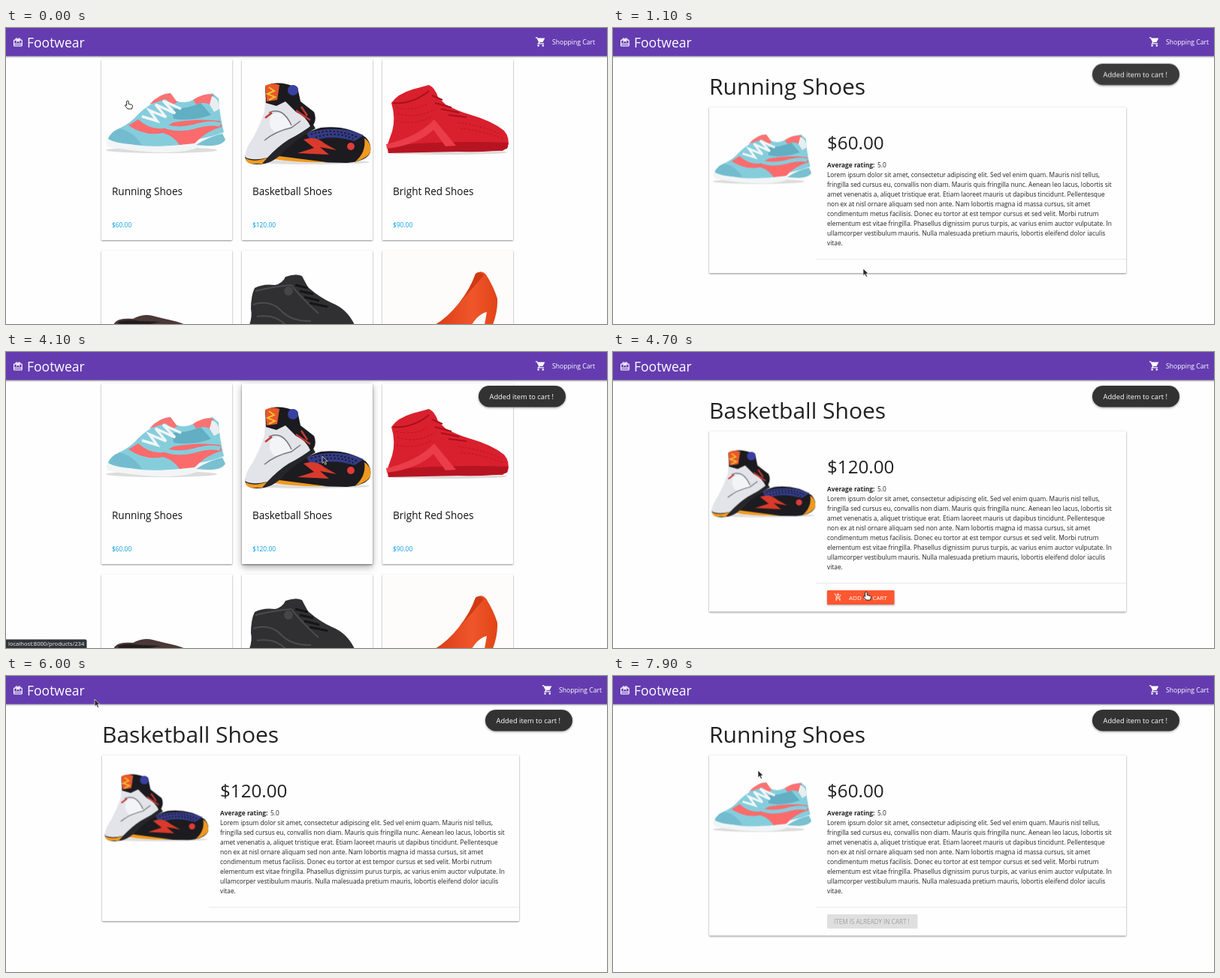
These frames come from a looping animation (800 by 395 pixels, 8000 ms). An HTML page:

```html
<!DOCTYPE html>
<html lang="en">
<head>
<meta charset="utf-8">
<title>Footwear</title>
<style>
html, body { margin: 0; width: 100%; height: 100%; overflow: hidden; background: #fefefe; }
svg { display: block; width: 100%; height: 100%; font-family: "Open Sans", "Noto Sans", sans-serif; }
text { white-space: pre; }
.card { fill: #fefefe; filter: drop-shadow(0 1px 1.1px rgba(0,0,0,.45)); }
.lift { fill: #fefefe; filter: drop-shadow(0 4px 5px rgba(0,0,0,.32)); }
.pill { fill: #323232; filter: drop-shadow(0 1px 1.5px rgba(0,0,0,.4)); }
.bar { fill: #643cb0; filter: drop-shadow(0 1px 1px rgba(0,0,0,.4)); }
.line { fill: none; stroke: #fff; stroke-width: 2; }
</style>
</head>
<body>
<svg id="stage" viewBox="0 0 800 395" preserveAspectRatio="none">
  <defs>
    <linearGradient id="orange">
      <stop offset="0" stop-color="#d93c16"/><stop offset=".6" stop-color="#f0562b"/><stop offset="1" stop-color="#e04416"/>
    </linearGradient>
    <g id="runner">
      <ellipse cx="80" cy="121" rx="74" ry="4" fill="#dcdcdc"/>
      <path fill="#f2f5f6" d="M8 106Q4 115 12 117Q70 127 105 123Q120 121 130 117Q160 116 165 107L160 94Z"/>
      <path fill="#79c0d0" d="M126 114Q145 102 161 99L165 107Q160 116 140 115Z"/>
      <path fill="#86cddc" d="M9 106Q12 97 24 92Q40 84 48 74Q58 64 72 56Q80 44 92 45L99 55Q112 60 122 54Q137 47 148 45L156 52Q157 72 163 97Q148 103 130 106L105 114Q60 118 40 113Q18 112 9 106Z"/>
      <path fill="#73bccf" d="M9 106Q12 97 24 92Q42 96 54 114Q25 113 9 106Z"/>
      <path fill="#62aec3" d="M94 66Q118 65 132 58L146 74Q120 83 96 79Z"/>
      <path fill="#fb6b6c" d="M36 88L49 80Q64 94 82 92L96 84Q130 78 158 82L160 90Q140 95 124 112L104 114Q96 102 82 98Q58 103 36 88Z"/>
      <path fill="none" stroke="#86cddc" stroke-width="6" d="M78 86Q96 96 122 90Q145 83 158 87"/>
      <path fill="#fb7273" d="M64 60Q76 46 92 45L101 57L94 61L86 53ZM122 54Q137 44 149 47L147 62Q138 55 126 60Z"/>
      <path fill="#e9eef0" d="M147 49Q157 52 157 66L150 70L144 60Z"/>
      <path fill="none" stroke="#f1f6f7" stroke-width="3.5" d="M54 76L74 82L64 68L86 77L72 60L98 72L82 55L106 66"/>
    </g>
    <g id="hoops">
      <ellipse cx="90" cy="137" rx="80" ry="3" fill="#dedede"/>
      <path fill="#1c1b20" d="M48 130Q75 99 105 91Q140 87 165 104Q173 112 171 124Q166 136 140 138Q90 138 48 130Z"/>
      <path fill="#343b86" d="M86 98Q130 86 162 101L150 109Q116 99 92 110Z"/>
      <path fill="#d93a2b" d="M82 107Q98 101 110 112L126 121L104 117L116 127L74 125L96 118Z"/>
      <path fill="#f0991f" d="M163 105Q173 111 171 124Q166 132 150 137Q166 124 163 105ZM50 129L112 137Q76 138 42 133Z"/>
      <path fill="none" stroke="#17171c" stroke-width="2" stroke-dasharray="2 3" d="M92 100Q124 90 154 104M98 104Q126 95 148 106"/>
      <circle cx="145" cy="116" r="5" fill="#dd3d36"/>
      <path fill="#26262a" d="M4 128Q4 140 20 140Q42 140 56 122Q76 104 98 92L92 82L30 120Z"/>
      <path fill="#e3e4e9" d="M31 54L30 70Q24 88 14 106Q5 118 4 130Q14 136 34 131Q48 116 62 107Q80 98 95 86Q101 74 80 58L60 54Z"/>
      <path fill="#1b1b1f" d="M32 58L31 36Q42 29 60 33L74 37L78 56L96 70Q101 82 92 91Q86 76 72 70L58 56L46 62Z"/>
      <path fill="#e8582b" d="M31 35Q40 30 50 34L47 54L33 56Z"/>
      <path fill="none" stroke="#f4bd32" stroke-width="2" d="M36 37L43 42L34 46L44 50L36 54"/>
      <circle cx="68" cy="41" r="7" fill="#3940a0"/>
      <path fill="none" stroke="#c33a35" stroke-width="2.5" d="M31 78L40 71M72 68L91 81M79 63L87 75"/>
      <path fill="#f3f4f7" d="M39 74Q58 64 66 90L44 97Q33 88 39 74Z"/>
      <path fill="none" stroke="#77787f" stroke-width="1.5" d="M30 108Q44 96 66 91L78 82M36 71Q54 62 66 88"/>
      <path fill="#f09a22" d="M5 132Q16 138 34 131L27 139H13Q5 138 5 132Z"/>
    </g>
    <g id="crimson">
      <ellipse cx="86" cy="124" rx="80" ry="3" fill="#dfdada"/>
      <path fill="#d9202e" d="M6 116L13 96Q18 78 12 58Q20 46 40 40L62 34Q70 38 74 50L84 60Q100 69 118 74Q146 82 162 95Q170 104 167 117L160 122L10 123Z"/>
      <path fill="none" stroke="#b91524" stroke-dasharray="3 2" d="M18 64Q42 70 62 58M20 72Q46 80 70 66M18 82Q44 88 66 76M100 84Q132 88 158 100M104 92Q130 94 162 106"/>
      <path fill="none" stroke="#a90f1d" stroke-width="2" d="M14 58Q40 60 62 42M66 48L80 54M70 58L92 64M78 66L102 71M88 74L112 77"/>
      <path fill="#b71422" d="M6 115Q90 108 168 111L166 119Q150 124 100 123L8 125Z"/>
      <path fill="#ea3c49" d="M5 113Q46 104 69 80L98 115L84 116L68 94Q47 114 6 119Z"/>
    </g>
    <g id="loafer">
      <path fill="#4b3837" d="M16 99Q20 89 42 91Q56 84 68 87L84 91Q100 94 112 99Z"/>
      <path fill="#231c1d" d="M22 95Q36 91 50 94L78 95L60 99H24Z"/>
    </g>
    <g id="hightop">
      <path fill="#303032" d="M10 99Q14 88 12 78Q12 60 17 50Q28 44 44 46Q54 44 58 35Q72 30 80 34L88 49Q104 63 120 70Q140 78 150 99Z"/>
      <path fill="none" stroke="#4c4c4e" stroke-width="2" d="M18 54Q42 48 66 46M15 72Q38 65 52 80T92 94M66 46Q76 60 102 84M20 88Q44 84 58 99"/>
      <path fill="none" stroke="#151517" stroke-width="3" d="M71 46L88 50M77 54L95 58M83 62L103 67M90 70L114 75"/>
      <circle cx="62" cy="54" r="6" fill="#464648"/>
    </g>
    <g id="heel">
      <path fill="#fdfcfb" d="M1 1H173V99H1Z"/>
      <path fill="url(#orange)" d="M124 31Q132 25 138 32Q148 48 153 64Q154 80 147 99H136L139 82Q128 84 119 99H70Q86 90 102 70Q117 52 124 31Z"/>
      <path fill="#d03a14" d="M124 31Q130 26 135 33Q119 52 102 70Q117 51 124 31Z"/>
    </g>
    <g id="trolley">
      <path fill="#fff" d="M5 4H21L16.5 13H8Z"/>
      <path class="line" d="M1 3H4L9 13L6.5 16H19"/>
      <g fill="#fff"><circle cx="7" cy="20" r="2"/><circle cx="17" cy="20" r="2"/></g>
    </g>
    <g id="trolleyAdd">
      <path class="line" d="M1 3H4L8 12H16L20 5M8 12L6 16H19M12 1V9M8 5H16"/>
      <g fill="#fff"><circle cx="7" cy="20" r="2"/><circle cx="17" cy="20" r="2"/></g>
    </g>
    <g id="gift" class="line">
      <rect x="3" y="7" width="18" height="13" rx="1"/>
      <circle cx="9" cy="5" r="2"/><circle cx="15" cy="5" r="2"/>
      <path d="M3 16H21M8 12.5L12 7L16 12.5"/>
    </g>
  </defs>
</svg>
<script>
const LOOP = 8000;
const INK = '#212121';
const stage = document.getElementById('stage');

const label = (x, y, size, str, fill = INK, weight = 400) =>
  `<text x="${x}" y="${y}" font-size="${size}" fill="${fill}" font-weight="${weight}">${str}</text>`;
const box = (x, y, w, h, attrs) => `<rect x="${x}" y="${y}" width="${w}" height="${h}" ${attrs}/>`;
const art = (name, x, y, scale = 1) =>
  `<use href="#${name}" transform="translate(${x} ${y}) scale(${scale})"/>`;
const group = (id, body) => `<g id="${id}">${body}</g>`;

const lorem = [
  'Lorem ipsum dolor sit amet, consectetur adipiscing elit. Sed vel enim quam. Mauris nisl tellus,',
  'fringilla sed cursus eu, convallis non diam. Mauris quis fringilla nunc. Aenean leo lacus, lobortis sit',
  'amet venenatis a, aliquet tristique erat. Etiam laoreet mauris ut dapibus tincidunt. Pellentesque',
  'non ex at nisl ornare aliquam sed non ante. Nam lobortis magna id massa cursus, sit amet',
  'condimentum metus facilisis. Donec eu tortor at est tempor cursus et sed velit. Morbi rutrum',
  'elementum est vitae fringilla. Phasellus dignissim purus turpis, ac varius enim auctor vulputate. In',
  'ullamcorper vestibulum mauris. Nulla malesuada pretium mauris, lobortis eleifend dolor iaculis',
  'vitae.'
];

function productCard(col, shoe, name, price) {
  const x = 127 + col * 187;
  return box(x, 42, 174, 241, 'rx="1" class="card"') +
    group('lift' + col, box(x, 42, 174, 241, 'rx="1" class="lift"')) +
    art(shoe, x, 42) + label(x + 14, 222.5, 13.55, name, '#111') + label(x + 14, 266, 8.4, price, '#039be5');
}
const teaser = (shoe, col) =>
  box(127 + col * 187, 297, 174, 241, 'rx="1" class="card"') + art(shoe, 127 + col * 187, 297);

const shortCard = box(128, 105.5, 555, 221.5, 'rx="1" class="card"');
const tallCard = box(128, 105.5, 555, 241, 'rx="1" class="card"');
const addButton = tallCard + box(285, 318, 89.5, 19, 'rx="1" fill="#ff5730" style="filter:drop-shadow(0 1px 1px rgba(0,0,0,.35))"') +
  art('trolleyAdd', 294, 321.5, .46) + label(314, 330.5, 8, 'ADD TO CART', '#fff');
const soldButton = tallCard + box(285, 318, 120.5, 19, 'rx="1" fill="#dfdfdf"') +
  label(294, 330.5, 8.15, 'ITEM IS ALREADY IN CART !', '#9f9f9f');

function detail(shoe, name, price, cards) {
  return label(128, 89, 30, name) + cards +
    art(shoe, 128, 105, .825) + label(285, 162, 24.2, price) +
    label(285, 186, 8.35, 'Average rating:', INK, 700) + label(352, 186, 8.35, '5.0') +
    lorem.map((line, i) => label(285, 199 + 13 * i, 8.35, line)).join('') +
    box(270, 308, 413, 1, 'fill="#e9e9e9"');
}

const toast = box(638, 45, 116, 28.5, 'rx="14.25" class="pill"') +
  label(652.5, 63, 9.3, 'Added item to cart !', '#fff');
const statusBar = (path, w) =>
  `<path d="M0 383.5H${w - 2}Q${w} 383.5 ${w} 385.5V395H0Z" fill="#30353a"/>` +
  label(3, 392, 7.6, 'localhost:8000/products' + path, '#f4f4f4');

stage.innerHTML += [
  group('grid',
    productCard(0, 'runner', 'Running Shoes', '$60.00') +
    productCard(1, 'hoops', 'Basketball Shoes', '$120.00') +
    productCard(2, 'crimson', 'Bright Red Shoes', '$90.00') +
    ['loafer', 'hightop', 'heel'].map(teaser).join('')),
  group('running', detail('runner', 'Running Shoes', '$60.00',
    group('shortRun', shortCard) + group('addRun', addButton) + group('soldRun', soldButton))),
  group('basket', detail('hoops', 'Basketball Shoes', '$120.00',
    group('shortBall', shortCard) + group('addBall', addButton))),
  box(-5, -5, 810, 42.5, 'class="bar"'),
  art('gift', 8.8, 12, .59), label(28, 26, 17.5, 'Footwear', '#fff'),
  group('cart', art('trolley', 713.3, 11, .62) + label(736, 22, 8.64, 'Shopping Cart', '#fff')),
  group('toasts', group('toastA', toast) + group('toastB', toast)),
  group('statusList', statusBar('', 92)),
  group('statusRun', statusBar('/233', 107.5)),
  group('statusBall', statusBar('/234', 107.5)),
  group('cursor',
    group('hand', '<path d="M-1.4 .8Q0 -.8 1.2 .8V4.5L5.6 5.4Q6.8 5.8 6.5 7.6L5.4 11H0L-3.4 7Q-3.8 5.4 -2.6 5.4L-1.4 6.6Z" fill="#fff" stroke="#111" stroke-width=".9"/>') +
    group('arrow', '<path d="M0 0V9.5L2.2 7.6L3.9 11.2L5.5 10.5L4 7L6.9 6.7Z" fill="#2b2b2b" stroke="#fff" stroke-width=".6"/>'))
].join('');

// Each stop is [ms, declarations]; values hold unless a stop sets its own easing.
let css = '';
function animate(ids, stops) {
  const name = 'k-' + ids[0];
  css += ids.map(id => '#' + id).join() + `{animation:${name} ${LOOP}ms step-end infinite}` +
    `@keyframes ${name}{` + stops.map(([ms, rule]) => `${ms / LOOP * 100}%{${rule}}`).join('') + '}';
}
const spans = (on, off, list) =>
  [[0, off], ...list.flatMap(([from, to]) => [[from, on], [to, off]])];
const show = (id, ...list) => animate([id], spans('opacity:1', 'opacity:0', list));
const hide = (id, ...list) => animate([id], spans('opacity:0', 'opacity:1', list));
const ease = curve => `;animation-timing-function:${curve}`;
const at = (x, y, steps) =>
  `transform:translate(${x}px,${y}px)` + (steps ? ease(`steps(${steps},start)`) : '');

const gridTimes = [[0, 300], [2700, 4200], [6700, 7500]];
show('grid', ...gridTimes);
animate(['cart', 'toasts'], spans(at(-9, 0), at(0, 0), gridTimes));
show('running', [400, 2500], [7600, LOOP]);
show('basket', [4300, 6500]);
show('shortRun', [1000, 7600]);
show('addRun', [0, 1000]);
show('soldRun', [7600, LOOP]);
hide('shortBall', [0, 5400]);
show('addBall', [0, 5400]);
show('lift0', [100, 300], [7200, 7500]);
show('lift1', [3900, 4200]);
show('lift2');
show('statusList', [2300, 3800], [6400, 7200]);
show('statusRun', [100, 500], [7200, 7800]);
show('statusBall', [3800, 4500]);

const hidden = 'opacity:0;' + at(0, 21);
const rising = 'opacity:.7;' + at(0, 21) + ease('cubic-bezier(.215,.61,.355,1)');
const shown = 'opacity:1;' + at(0, 0);
animate(['toastA'], [[0, hidden], [950, rising], [1250, shown],
  [5050, shown + ease('cubic-bezier(.19,1,.22,1)')], [5425, 'opacity:0;' + at(0, -24)], [LOOP, hidden]]);
animate(['toastB'], [[0, hidden], [5380, rising], [5680, shown], [LOOP, shown]]);

animate(['cursor'], [
  [0, at(162, 97)], [500, at(162, 97, 5)], [1000, at(333, 321)],
  [1700, at(333, 321, 5)], [2200, at(70, 18)],
  [3500, at(70, 18, 5)], [4000, at(421, 139)],
  [4500, at(421, 139, 3)], [4800, at(337, 320)], [4900, at(334, 320)],
  [5900, at(220, 150)], [6000, at(118, 31)], [6100, at(92, 4)], [6200, at(70, 18)],
  [6800, at(70, 18, 6)], [7400, at(193, 126)], [LOOP, at(193, 126)]
]);
const handTimes = [[0, 400], [900, 1000], [2100, 3500], [3900, 4100], [4700, 5400], [6200, 6800], [7300, 7500]];
show('hand', ...handTimes);
hide('arrow', ...handTimes);

document.head.appendChild(document.createElement('style')).textContent = css;
</script>
</body>
</html>
```
